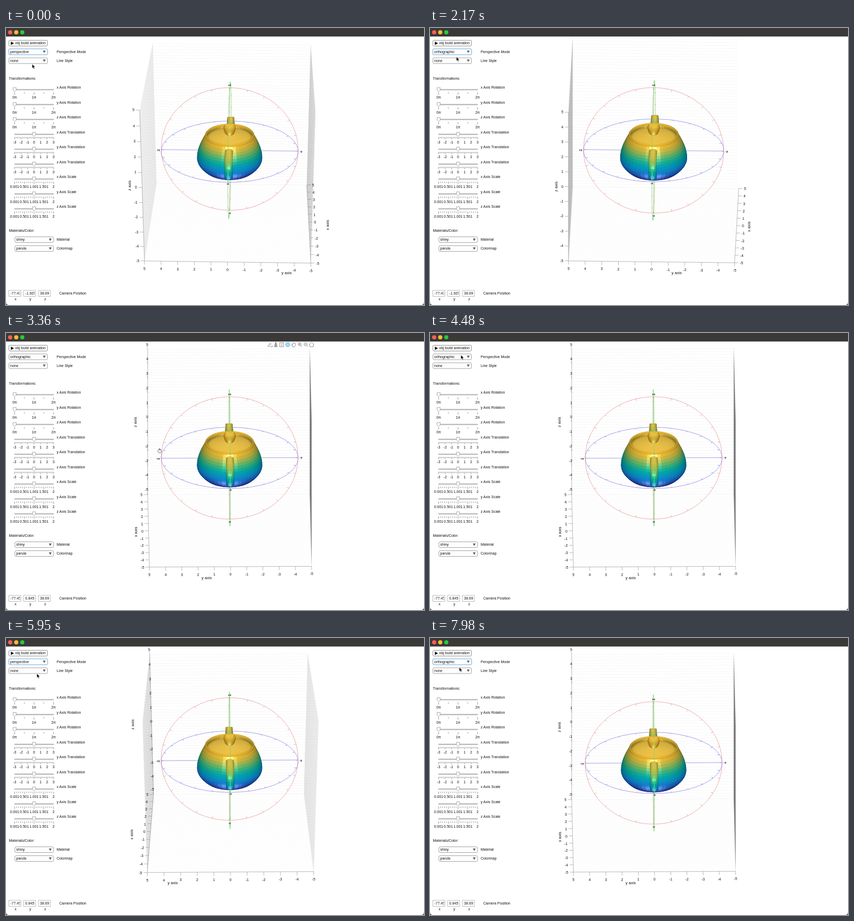
An HTML page with a canvas for the animation above (8 s loop, 800 by 530 pixels).

```html
<!DOCTYPE html>
<html lang="en">
<head>
<meta charset="utf-8">
<title>Teapot viewer</title>
<style>
  html, body { margin: 0; width: 100%; height: 100%; overflow: hidden; background: #fff; }
  canvas, #ui { position: absolute; left: 0; top: 0; width: 800px; height: 530px; }
  text { font: 7px "Liberation Sans", Arial, sans-serif; fill: #111; white-space: pre; }
  .title { font-size: 7.7px; }
  .mark { font-size: 5.5px; font-weight: bold; }
</style>
</head>
<body>
<canvas id="plot"></canvas>
<svg id="ui" viewBox="0 0 800 530">
  <g id="axes"></g>
  <g id="panel"></g>
  <g id="live"></g>
</svg>
<script>
const LOOP = 8000, DIST = 86.6, ELEV = Math.atan(0.5), RING = 4.22, BASE = -1.41;
const CE = Math.cos(ELEV), SE = Math.sin(ELEV), PI = Math.PI;
const OPEN = [[910, 1680], [4690, 5390], [6580, 7420]]; // each close flips the projection

const $ = id => document.getElementById(id);
const clamp = v => Math.max(0, Math.min(1, v));
const mix = (a, b, k) => a + (b - a) * k;
const ease = k => { k = clamp(k); return k * k * (3 - 2 * k); };
const within = (t, a, b) => t >= a && t < b;
const times = (n, fn) => Array.from({ length: n }, (_, i) => fn(i));
const mean = list => list.reduce((s, v) => s + v, 0) / list.length;

// ---------- SVG helpers ----------
const text = (x, y, s, anchor = 'start', cls = '') =>
  `<text x="${x}" y="${y + 2.1}" text-anchor="${anchor}" class="${cls}">${s}</text>`;
const turned = (x, y, s) =>
  `<text class="title" text-anchor="middle" transform="translate(${x + 2.5} ${y}) rotate(-90)">${s}</text>`;
const rect = (x, y, w, h, fill, stroke = 'none', r = 0, sw = 0.8) =>
  `<rect x="${x}" y="${y}" width="${w}" height="${h}" rx="${r}" fill="${fill}" stroke="${stroke}" stroke-width="${sw}"/>`;
const path = (d, stroke, fill = 'none', sw = 0.8) =>
  `<path d="${d}" stroke="${stroke}" fill="${fill}" stroke-width="${sw}"/>`;
const dot = (x, y, r, fill, stroke = 'none') =>
  `<circle cx="${x}" cy="${y}" r="${r}" fill="${fill}" stroke="${stroke}" stroke-width=".8"/>`;

// ---------- teapot mesh ----------
const quads = [];
function mesh(rows, cols, fn) {
  for (let i = 0; i < rows; i++) for (let j = 0; j < cols; j++) {
    const at = (a, b) => fn((i + a) / rows, (j + b) / cols * 2 * PI);
    quads.push([at(0, 0), at(0, 1), at(1, 1), at(1, 0)]);
  }
}
// outline(t) gives [radius, height]
const lathe = (rows, outline) => mesh(rows, 48, (t, q) => {
  const [r, z] = outline(t);
  return [r * Math.cos(q), r * Math.sin(q), z + BASE];
});
// spine(t) gives [x, height]; the section is an ellipse across it
const tube = (rows, spine, thick, wide) => mesh(rows, 14, (t, q) => {
  const [x, z] = spine(t), [x0, z0] = spine(Math.max(0, t - 0.02)), [x1, z1] = spine(Math.min(1, t + 0.02));
  const len = Math.hypot(x1 - x0, z1 - z0), h = thick(t) * Math.cos(q);
  return [x - (z1 - z0) / len * h, wide(t) * Math.sin(q), z + (x1 - x0) / len * h + BASE];
});

const upper = t => [1.5 + 0.5 * Math.sin(t * PI / 2), 2.4 - 1.5 * t];
const lower = t => [2 - 0.5 * t ** 1.9, 0.9 - 0.75 * t];
const foot = t => [1.5 * Math.cos(t * PI / 2), 0.15 * (1 - Math.sin(t * PI / 2))];
const rim = t => [1.45 + 0.05 * Math.cos(t * PI), 2.4 + 0.12 * Math.sin(t * PI)];
const lid = t => [1.4 * t, 2.25 + 0.3 * (1 - t) ** 0.6];
const knob = t => [0.2 * t * t + 0.33 * Math.abs(Math.sin(PI * t ** 0.6)), 3.15 - 0.62 * ease(t)];
lathe(9, upper);
lathe(8, lower);
lathe(4, foot);
lathe(4, rim);
lathe(10, lid);
lathe(8, knob);
tube(18, t => [-1.55 - 0.4 * t - 1.1 * Math.abs(Math.sin(PI * t)) ** 0.7, 1.45 + 0.69 * Math.cos(PI * t)],
  () => 0.14, () => 0.23);
tube(12, t => [1.7 + 1.3 * t + 0.2 * Math.sin(PI * t), 0.86 + 1.39 * t ** 1.3],
  t => mix(0.42, 0.24, t), t => mix(0.5, 0.2, Math.sqrt(t)));

// blue through teal and green to gold
const parula = k => [
  60 * clamp(1 - k / 0.45) + 250 * ease((k - 0.45) / 0.4),
  38 + 158 * Math.sin(clamp(k / 0.6) * PI / 2),
  168 + 80 * ease(k / 0.2) - 195 * ease((k - 0.25) / 0.6)
];

// ---------- camera ----------
function viewAt(t) {
  const persp = OPEN.filter(o => t >= o[1]).length % 2 === 0;
  const a = mix(1.427, -0.6254, ease((t - 2940) / 350)) * PI / 180, left = a < 0;
  const s = persp || left ? 31.03 : 31.8, cy = !persp && left ? 239 : 234.1;
  return { persp, left, a, s, cy, sin: Math.sin(a), cos: Math.cos(a) };
}
const toEye = (v, [x, y, z]) => {
  const d = x * v.cos + y * v.sin;
  return [x * v.sin - y * v.cos, z * CE + d * SE, z * SE - d * CE];
};
const project = (v, p) => {
  const [r, u, near] = toEye(v, p);
  const k = v.s * (v.persp ? DIST / (DIST - near) : 1);
  return [428 + r * k, v.cy - u * k];
};

// ---------- canvas: grid, compass, teapot ----------
const canvas = $('plot'), ctx = canvas.getContext('2d');
const dpr = window.devicePixelRatio || 1;
canvas.width = 800 * dpr;
canvas.height = 530 * dpr;

function drawGrid(v) {
  ctx.lineWidth = 0.8;
  ctx.setLineDash([1, 2]);
  const line = (p, q, alpha) => {
    ctx.strokeStyle = `rgba(0,0,0,${alpha})`;
    ctx.beginPath();
    ctx.moveTo(...project(v, p));
    ctx.lineTo(...project(v, q));
    ctx.stroke();
  };
  // a side wall shows only when its inner face points at the camera
  const sides = [5, -5].filter(y =>
    (project(v, [-5, y, 5])[0] - project(v, [5, y, 5])[0]) * y < 0);
  for (let i = 0; i <= 50; i++) {
    const g = -5 + i / 5;
    line([5, 5, g], [5, -5, g], 0.13);
    line([g, 5, -5], [g, -5, -5], 0.08);
    for (const y of sides) {
      line([g, y, -5], [g, y, 5], 0.14);
      line([-5, y, g], [5, y, g], 0.1);
    }
  }
  ctx.setLineDash([]);
}

function shade(pts, eye) {
  const sub = (a, b) => a.map((c, i) => c - b[i]);
  const p = sub(eye[2], eye[0]), q = sub(eye[3], eye[1]);
  let n = [p[1] * q[2] - p[2] * q[1], p[2] * q[0] - p[0] * q[2], p[0] * q[1] - p[1] * q[0]];
  const len = (Math.hypot(...n) || 1) * (n[2] < 0 ? -1 : 1);
  n = n.map(c => c / len);
  const top = Math.max(0, n[1] * CE + n[2] * SE);
  const low = Math.max(0, n[2] * 0.54 - n[1] * 0.84);
  const lit = 0.5 + 0.38 * n[2] + 0.16 * top;
  const shine = 110 * Math.max(0, 2 * n[2] * n[2] - 1) ** 20 + 26 * top ** 12 + 100 * low ** 24;
  const k = (mean(pts.map(c => c[2])) - BASE) / 2.85;
  return `rgb(${parula(k).map(c => Math.round(Math.min(255, c * lit + shine)))})`;
}

function compassLines() {
  const lines = [];
  const planes = [
    ['#e89090', (c, s) => [0, c, s]],
    ['#8080e6', (c, s) => [c, s, 0]],
    ['#6cd86c', (c, s) => [c, 0, s]]
  ];
  for (const [color, at] of planes) {
    const on = (deg, r) => at(r * Math.cos(deg * PI / 180), r * Math.sin(deg * PI / 180));
    const add = (p, q) => lines.push([color, p, q]);
    for (let d = 0; d < 360; d += 4) add(on(d, RING), on(d + 4, RING));
    for (let d = 0; d < 360; d += 15) add(on(d, RING), on(d, RING - 0.14));
    // one diameter per plane, cut short so it sorts with the teapot
    for (let i = -20; i < 20; i++) {
      const angle = color === planes[0][0] ? 90 : color === planes[1][0] ? 90 : 0;
      add(on(angle, RING * i / 20), on(angle, RING * (i + 1) / 20));
    }
  }
  return lines;
}

const compass = compassLines();
function drawSolid(v) {
  const items = quads.map(pts => {
    const eye = pts.map(p => toEye(v, p));
    return { pts, near: mean(eye.map(e => e[2])), fill: shade(pts, eye) };
  });
  for (const [color, ...pts] of compass)
    items.push({ pts, near: mean(pts.map(p => toEye(v, p)[2])), color });
  items.sort((a, b) => a.near - b.near);
  for (const it of items) {
    ctx.beginPath();
    it.pts.forEach((p, i) => ctx[i ? 'lineTo' : 'moveTo'](...project(v, p)));
    ctx.strokeStyle = it.fill || it.color;
    ctx.lineWidth = it.fill ? 0.5 : 0.75;
    if (it.fill) {
      ctx.closePath();
      ctx.fillStyle = it.fill;
      ctx.fill();
    }
    ctx.stroke();
  }
}

// ---------- axes and labels ----------
function axis(v, at, tick, label, anchor) {
  const pt = n => project(v, at(n)), a = pt(-5), b = pt(5);
  let d = `M${a}L${b}`, out = '';
  for (let n = -5; n <= 5; n++) {
    const [x, y] = pt(n);
    d += `M${x} ${y}l${tick}`;
    out += text(x + label[0], y + label[1], n, anchor);
  }
  return { svg: path(d, '#999', 'none', 0.7) + out, x: (a[0] + b[0]) / 2, y: (a[1] + b[1]) / 2 };
}
function axesMarkup(v) {
  const side = v.left ? -1 : 1, gap = v.persp ? 36 : 24;
  const z = v.left
    ? axis(v, n => [5, 5, n], [-1, -5], [1, -9], 'end')
    : axis(v, n => [-5, 5, n], [-7, 0], [-10, 0], 'end');
  const x = axis(v, n => [n, -5 * side, -5], [7 * side, 0], [10 * side, 1], v.left ? 'end' : 'start');
  const y = axis(v, n => [-5, n, -5], [0, 7], [0, 15], 'middle');
  const mark = (p, s) => text(...project(v, p), s, 'middle', 'mark');
  return z.svg + x.svg + y.svg +
    turned(z.x - (v.left ? gap : 24), z.y, 'z axis') + turned(x.x + side * gap, x.y + 2, 'x axis') +
    text(428 + side * (v.persp ? 109 : 44), 468.5, 'y axis', 'middle', 'title') +
    mark([0, 0, 4.4], '+z') + mark([0, 0, -4.4], '-z') +
    mark([0, 4.4, 0], '+y') + mark([0, -4.4, 0], '-y') + mark([-4.4, 0, 0], '-x');
}

// ---------- control panel ----------
const combo = (x, y, label, ring) =>
  (ring ? rect(x - 0.3, y - 0.3, 74.6, 11.6, 'none', '#c4e0f8', 2.5, 1.5) : '') +
  rect(x, y, 74, 11, '#fdfdfd', ring ? '#6fa6d0' : '#8c8c8c', 2.5) +
  text(x + 2.5, y + 5.4, label) +
  `<path d="M${x + 65} ${y + 3.2}h5.4l-2.7 4.8z" fill="#606060"/>`;

function slider(y, name, value, ticks, majorEvery, labels) {
  const at = k => 16.5 + 74.5 * k, x = at(value);
  const d = times(ticks + 1, i => `M${at(i / ticks)} ${y + 5}v${i % majorEvery ? 2.6 : 4.4}`).join('');
  return rect(16, y - 0.8, 75.5, 1.6, '#b4b4b4', '#a0a0a0', 0.8, 0.4) + path(d, '#666', 'none', 0.7) +
    path(`M${x - 3} ${y - 4}h6v5l-3 3l-3 -3z`, '#999', '#fafafa') +
    labels.map((s, i) => text(at(i / (labels.length - 1)), y + 15, s, 'middle')).join('') +
    text(97, y - 4, name);
}

function panelMarkup() {
  const kinds = [
    ['Rotation', 0, 4, 2, times(3, i => i + 'π')],
    ['Translation', 0.5, 30, 5, times(7, i => i - 3)],
    ['Scale', 0.5, 20, 5, times(5, i => Math.min(2, 0.001 + i / 2))]
  ];
  let out = path('M0 524v6h6q-6 0 -6 -6M800 524v6h-6q6 0 6 -6', 'none', '#555') +
    rect(0, 0, 800, 16.3, '#3a3938') +
    ['#fe5f57', '#febc2e', '#28c840'].map((c, i) => dot(8 + 11.6 * i, 8.3, 4, c)).join('') +
    rect(5.5, 23.5, 74, 11, '#fdfdfd', '#777', 2.5) +
    '<path d="M9.3 26l6 3.2l-6 3.2z" fill="#111"/>' +
    text(17.5, 29.2, 'obj build animation') +
    text(97, 45.4, 'Perspective Mode') + text(97, 62.5, 'Line Style') +
    text(5.5, 97, 'Transformations:') +
    combo(5.5, 57, 'none') + text(5.5, 388, 'Materials/Color:') +
    combo(17, 399.5, 'shiny') + text(97, 405, 'Material') +
    combo(17, 416.5, 'parula') + text(97, 422, 'Colormap') +
    text(102, 508, 'Camera Position');
  kinds.forEach(([kind, ...rest], k) => ['x', 'y', 'z'].forEach((ax, i) => {
    out += slider(118 + 28.5 * (3 * k + i), `${ax} Axis ${kind}`, ...rest);
    if (!k) out += text(18.3 + 28.3 * i, 519, ax, 'middle');
  }));
  return out;
}

function fields(v) {
  const flat = DIST * CE;
  const vals = [(-flat * v.cos).toFixed(2), (-flat * v.sin).toFixed(3), '38.69'];
  return vals.map((s, i) => {
    const x = 5.5 + 28.3 * i;
    return rect(x, 502, 23, 11.5, '#fff', '#aaa') +
      `<svg x="${x + 1}" y="502" width="20.2" height="11">${text(2, 5.9, s)}</svg>`;
  }).join('');
}

function popup(current, y) {
  const hover = y > 65 ? 1 : y > 52 ? 0 : current;
  return rect(5.5, 51.5, 74, 28, '#ececec', '#777') + ['orthographic', 'perspective'].map((s, i) => {
    const top = 52 + 13.6 * i;
    return (i === hover ? rect(6, top, 73, 13, '#addcfb', '#3c8fcb')
      : i === current ? rect(6, top, 73, 13.3, '#bcbcbc') : '') + text(9, top + 6.5, s);
  }).join('');
}

function toolbar() {
  const g = '#777', y = 22.3, col = i => 505 + 11.4 * i;
  const lens = i => dot(col(i), y - 0.8, 3, 'none', g) + path(`M${col(i) + 2} ${y + 1.4}l2.8 2.8m-6.4 -5h3.2`, g);
  return path(`M${col(0) - 4} ${y + 3}l4.5 -6l2 1.6l-4.5 5zm4 1h5v-2`, g) +
    path(`M${col(1) - 2.5} ${y + 4}h5l-1 -5l-1.5 -4l-1.5 4z`, g, '#aaa') +
    rect(col(2) - 4, y - 4, 7.5, 8, '#fff', g) + path(`M${col(2) - 2} ${y - 1.3}h4m-4 3h4`, g) +
    dot(col(3), y, 4.2, '#c9e9fb', '#35a3e0') + rect(col(3) - 2, y - 2, 4, 4, 'none', '#35a3e0', 1, 0.6) +
    path(`M${col(4) - 4} ${y}l2 1v-4h5v5l-1.4 2.5h-3.4z`, g) +
    lens(5) + path(`M${col(5)} ${y - 2.4}v3.2`, g) + lens(6) +
    path(`M${col(7) - 5} ${y}l5 -4.6l5 4.6m-8.4 -1v5h6.8v-5`, g);
}

// ---------- pointer ----------
// start of each move and where it goes; longer moves take longer
const MOVES = [
  [400, 50, 44], [1030, 49, 54], [2140, 288, 226], [2940, 294, 226],
  [3430, 59, 42], [4720, 59, 68], [6230, 57, 43], [6680, 56, 56]
];
function pointerAt(t) {
  let x = 50, y = 69;
  for (const [from, tx, ty] of MOVES) {
    const k = ease((t - from) / (300 + 1.3 * Math.hypot(tx - x, ty - y)));
    x = mix(x, tx, k);
    y = mix(y, ty, k);
    if (k < 1) break;
  }
  return [x, y];
}
const pointer = (x, y) => x > 230
  ? dot(x, y, 3.4, '#fff', '#555') + path(`M${x - 1.5} ${y - 4.8}l3 1.2l-2 2.2`, '#222')
  : path(`M${x} ${y}v8.2l1.9 -1.7l1.4 3l1.5 -.7l-1.4 -2.9h2.7z`, '#fff', '#000', 0.7);

// ---------- playback ----------
let shown = '';
function render(t) {
  const v = viewAt(t), key = v.persp + '|' + v.a;
  if (key !== shown) {
    shown = key;
    ctx.setTransform(dpr, 0, 0, dpr, 0, 0);
    ctx.fillStyle = '#fff';
    ctx.fillRect(0, 0, 800, 530);
    drawGrid(v);
    drawSolid(v);
    $('axes').innerHTML = axesMarkup(v);
  }
  const [x, y] = pointerAt(t), mode = v.persp ? 1 : 0;
  const open = OPEN.some(o => within(t, ...o));
  const ring = !open && !within(t, 2520, OPEN[1][0]);
  $('live').innerHTML = combo(5.5, 40, mode ? 'perspective' : 'orthographic', ring) + fields(v) +
    (open ? popup(mode, y) : '') + (within(t, 2520, 3640) ? toolbar() : '') + pointer(x, y);
}
$('panel').innerHTML = panelMarkup();
const start = performance.now();
function tick() {
  render((performance.now() - start) % LOOP);
  requestAnimationFrame(tick);
}
tick();
</script>
</body>
</html>
```
